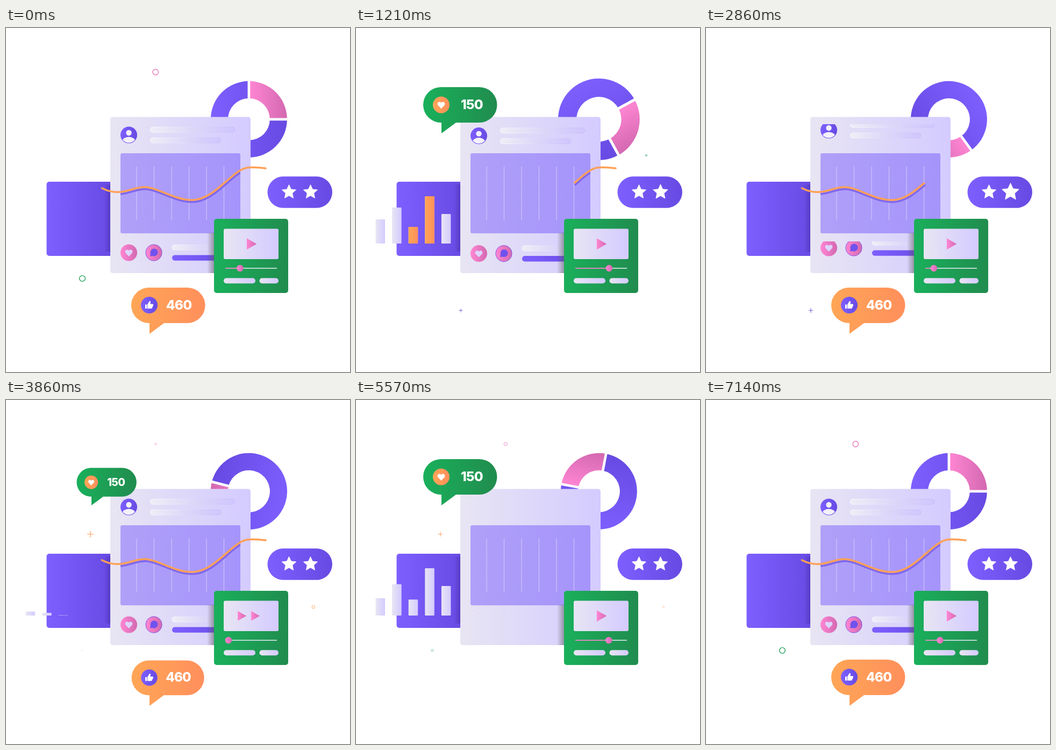
Animation of 640x640 px, one loop 7210 ms. Source, as an HTML page:

```html
<!DOCTYPE html>
<html lang="en">
<head>
<meta charset="utf-8">
<title>Social dashboard</title>
<style>
  html, body { margin: 0; width: 100%; height: 100%; overflow: hidden; background: #fff; }
  svg { display: block; width: 100%; height: 100%; }
  text { font: 800 24.5px Inter, sans-serif; letter-spacing: -.8px; text-anchor: middle; fill: #fff; }
</style>
</head>
<body>
<svg viewBox="0 0 640 640">
  <defs>
    <linearGradient id="violet"><stop stop-color="#7d5fff"/><stop offset="1" stop-color="#674ae2"/></linearGradient>
    <linearGradient id="pink"><stop stop-color="#ff86d3"/><stop offset="1" stop-color="#d368b0"/></linearGradient>
    <linearGradient id="pale"><stop stop-color="#e8e5f3"/><stop offset="1" stop-color="#d4cbff"/></linearGradient>
    <linearGradient id="green"><stop stop-color="#1ab05b"/><stop offset="1" stop-color="#208c4e"/></linearGradient>
    <linearGradient id="orange"><stop stop-color="#ffa656"/><stop offset="1" stop-color="#ff8f5c"/></linearGradient>
    <linearGradient id="panel"><stop stop-color="#b0a0f8"/><stop offset="1" stop-color="#a594fb"/></linearGradient>
    <linearGradient id="field"><stop stop-color="#efedf6"/><stop offset=".5" stop-color="#ddd7f8"/><stop offset="1" stop-color="#d0c6fd"/></linearGradient>
    <linearGradient id="edge"><stop stop-color="#fff"/><stop offset="1" stop-color="#c3b7f8"/></linearGradient>
    <linearGradient id="dusk"><stop stop-color="#4a30b0" stop-opacity="0"/><stop offset="1" stop-color="#4a30b0" stop-opacity=".65"/></linearGradient>
    <linearGradient id="shade"><stop stop-color="#555" stop-opacity="0"/><stop offset="1" stop-color="#555" stop-opacity=".55"/></linearGradient>
    <clipPath id="topRow"><rect x="205" y="179" width="240" height="40"/></clipPath>
    <clipPath id="bottomRow"><rect x="205" y="397" width="240" height="41"/></clipPath>
    <clipPath id="panelBox"><rect x="213" y="233" width="223" height="149"/></clipPath>
    <clipPath id="face"><circle cx="228.5" cy="199" r="14.5"/></clipPath>
    <path id="wave" pathLength="1" d="M178.5 298C192 305 205 307 220 304S244 296 258 296C283 296.500 312 320 346 320C388 320 420 265 448 260C460 258.500 472 259.500 483 261"/>
    <path id="balloon" d="M-1-86H70.500A33 33 0 0 1 70.500-20H27L0 0V-20H-1A33 33 0 0 1-1-86Z"/>
    <path id="heart" d="M0 6.500L-6 .3C-9-3.500-4-8.500 0-4.300C4-8.500 9-3.500 6 .3Z"/>
    <path id="play" d="M-8.800-10.500L9.500 0L-8.800 10.500Z" fill="url(#pink)" stroke-linejoin="round"/>
    <path id="star" fill="#fff" stroke="#fff" stroke-width=".8" stroke-linejoin="round"/>
  </defs>

  <g id="donut">
    <path d="M-71 0A71 71 0 1 0 0-71V-39A39 39 0 1 1-39 0Z" fill="none"/>
    <path d="M0-71A71 71 0 1 0 71 0H39A39 39 0 1 1 0-39Z" fill="url(#violet)"/>
    <path d="M0-71A71 71 0 0 1 71 0H39A39 39 0 0 0 0-39Z" fill="url(#pink)"/>
    <path d="M0-36V-74M36 0H74" stroke="#fff" stroke-width="4.700"/>
  </g>

  <rect x="75.500" y="286" width="125" height="138" rx="5" fill="url(#violet)"/>
  <rect x="183" y="291" width="12" height="125" fill="url(#dusk)"/>
  <rect x="194" y="165.500" width="261" height="290.500" rx="4.500" fill="url(#pale)"/>

  <g clip-path="url(#topRow)"><g class="row">
    <circle cx="228.500" cy="199" r="15.500" fill="url(#violet)"/>
    <g clip-path="url(#face)" fill="#f3f1fb">
      <circle cx="228.500" cy="195" r="5.200"/>
      <ellipse cx="228.500" cy="212" rx="12.500" ry="9.500"/>
    </g>
    <g fill="url(#field)" stroke="url(#edge)" stroke-width=".8">
      <rect x="268.500" y="184.300" width="157" height="9.800" rx="4.900"/>
      <rect x="268.500" y="204.300" width="131" height="9.500" rx="4.700"/>
    </g>
  </g></g>

  <rect x="213" y="233" width="223" height="149" rx="3" fill="url(#panel)"/>
  <path d="M243 257.500V357.500M275.500 257.500V357.500M308 257.500V357.500M340.500 257.500V357.500M373 257.500V357.500M405.500 257.500V357.500" stroke="#cbc1fc" stroke-width="1.300"/>

  <g clip-path="url(#bottomRow)"><g class="row">
    <circle cx="228.500" cy="418" r="15.500" fill="url(#pink)"/>
    <use href="#heart" x="228.500" y="418.500" fill="#ddd5fd"/>
    <circle cx="275" cy="418" r="15.200" fill="url(#pink)" stroke="#7656ee" stroke-width=".9"/>
    <path d="M268 424.500L269 420A7 7 0 1 1 273 424Z" fill="#7052ee"/>
    <rect x="309" y="403.500" width="118" height="9.500" rx="4.700" fill="url(#field)" stroke="url(#edge)" stroke-width=".8"/>
    <rect x="309" y="422.500" width="118" height="10.300" rx="5" fill="url(#violet)"/>
  </g></g>

  <g id="bars"></g>

  <g fill="none" stroke-linecap="round" stroke-width="3.600">
    <g clip-path="url(#panelBox)"><use href="#wave" class="line" x="1" y="3.800" stroke="#8068ec"/></g>
    <use href="#wave" class="line" stroke="#ffa057"/>
  </g>

  <rect x="374" y="381" width="14" height="75" fill="url(#shade)"/>
  <rect x="387" y="355" width="138" height="138" rx="5" fill="url(#green)"/>
  <rect x="405" y="373.500" width="102" height="56.500" rx="3" fill="url(#pale)"/>
  <use id="playA" href="#play"/>
  <use id="playB" href="#play"/>
  <path d="M408 447H504" stroke="#b9d8d0" stroke-width="1.800"/>
  <path id="played" stroke="#d78abb" stroke-width="1.800"/>
  <circle id="knob" cy="447" r="6.200" fill="url(#pink)"/>
  <rect x="405" y="465.300" width="59" height="10" rx="5" fill="url(#pale)"/>
  <rect x="471.500" y="465.300" width="35.500" height="10" rx="5" fill="url(#pale)"/>

  <rect x="486.500" y="276.300" width="120.500" height="58.500" rx="29.200" fill="url(#violet)"/>
  <use id="starA" href="#star"/>
  <use id="starB" href="#star"/>

  <g id="likes">
    <use href="#balloon" fill="url(#green)"/>
    <circle cx="-.5" cy="-53" r="15.500" fill="url(#orange)"/>
    <use href="#heart" x="-.5" y="-52.500" fill="#fff"/>
    <text x="56.500" y="-45">150</text>
  </g>
  <g id="thumbs">
    <use href="#balloon" fill="url(#orange)"/>
    <circle cx="-.5" cy="-53.500" r="15.500" fill="url(#violet)"/>
    <path transform="translate(-.5 -53.500)" d="M-7.500-1h3v7.500h-3zM-3.500 6.500V-1L.5-7.500Q3-7.500 2.500-5L1.700-2H6Q8-2 7.500 0L5.500 5Q5 6.500 3.500 6.500Z" fill="#fff"/>
    <text x="54.500" y="-45.500">460</text>
  </g>
  <g id="sparks" fill="none"></g>
</svg>
<script>
const LOOP = 7210, STEP = 71.4, LAST = 100;
const $ = id => document.getElementById(id);
const all = name => [...document.querySelectorAll(name)];

const clamp = v => Math.min(1, Math.max(0, v));
const linear = u => u;
const easeIn = u => u * u;
const easeOut = u => 1 - (1 - u) ** 2;
const easeBoth = u => u < .5 ? 2 * u * u : 1 - 2 * (1 - u) ** 2;
const ramp = (x, from, to, ease = linear) => ease(clamp((x - from) / (to - from)));
const mod = (x, period) => (x % period + period) % period;
const distance = (x, peak, period) => {
  const d = mod(x - peak, period);
  return Math.min(d, period - d);
};
const pulse = (d, width) => d < width ? Math.cos(d / width * Math.PI / 2) ** 2 : 0;

// Steps are [time, value, easing into it].
function tween(steps, x) {
  const i = steps.findIndex(s => s[0] > x);
  if (i < 0) return steps[steps.length - 1][1];
  if (i === 0) return steps[0][1];
  const [t0, v0] = steps[i - 1], [t1, v1, ease] = steps[i];
  return v0 + (v1 - v0) * ramp(x, t0, t1, ease);
}

function place(el, x, y, scale, extra = "") {
  el.setAttribute("transform", `translate(${x} ${y}) ${extra} scale(${scale})`);
  el.style.display = scale > .005 ? "" : "none";
}

$("star").setAttribute("d", "M" + Array.from({ length: 10 }, (_, i) => {
  const r = i % 2 ? 6.6 : 13.8, a = i * Math.PI / 5;
  return `${(r * Math.sin(a)).toFixed(2)} ${(-r * Math.cos(a)).toFixed(2)}`;
}).join("L") + "Z");

const barTops = [356, 334, 370, 313, 346];
$("bars").innerHTML = barTops.map((top, i) => {
  const rect = fill => `<rect y="${top - 401}" width="17.500" height="${401 - top}" rx="1" fill="url(#${fill})"/>`;
  return `<g>${rect("pale")}${i === 2 || i === 3 ? rect("orange") : ""}</g>`;
}).join("");
const bars = [...$("bars").children];

// Shape, x, y, size, colour, peak, half width of the twinkle.
const sparks = [
  ["ring", 278.3, 82, 5.2, "#e878c0", 0, 5.7],
  ["ring", 142, 466, 5.4, "#22a05a", -.5, 5],
  ["ring", 572, 385, 5, "#ff9a58", 7, 5.5],
  ["plus", 157, 249.5, 6, "#ff9a58", 5.1, 5.1],
  ["plus", 540, 237, 4, "#2aa377", 19.2, 4.5],
  ["plus", 195, 525.5, 4.2, "#7d68dc", 15.3, 4.8],
  ["plus", 350, 140, 3.8, "#7560f0", 10.5, 4.7],
  ["plus", 417.5, 532.5, 6.6, "#e070bb", 10.5, 4.7]
];
$("sparks").innerHTML = sparks.map(([shape, , , r, colour]) => shape === "ring"
  ? `<circle r="${r}" stroke="${colour}" stroke-width="1.400"/>`
  : `<path d="M${-r} 0H${r}M0 ${-r}V${r}" stroke="${colour}" stroke-width="1.200"/>`).join("");
const sparkEls = [...$("sparks").children];

const likeSteps = [[1, 0], [7, 1.08, easeOut], [11, 1, easeBoth], [28, 1], [33, 0, easeIn]];
const thumbSteps = [[3.2, 1], [9.2, 0, easeIn], [28, 0], [34, 1.075, easeOut], [38.5, 1, easeBoth]];
const glowSteps = [[12, 0], [14, 1], [17.5, 1], [19.5, 0]];
const knobSteps = [[0, 435.5], [17, 471], [20, 474], [40, 424], [47, 414], [54, 414], [70, 456], [85, 483], [100, 435.5]];
const splitSteps = [[49, 0], [52, 1], [57, 1], [60, 0]];

function scrollOffset(k) {
  const p = mod(k - 2, 100 / 3);
  if (p < 9.8) return -40 * easeIn(p / 9.8);
  return 40 * (1 - ramp(p, 9.8, 17.7)) ** 3;
}

function draw(k) {
  const half = k % 50;

  const swell = 1 + .07 * pulse(distance(k, 50 / 3, 100 / 3), 4.5);
  place($("donut"), 451.9, 169.8, swell, `rotate(${k * 3.6})`);

  for (const row of all(".row")) row.setAttribute("transform", `translate(0 ${scrollOffset(k)})`);

  bars.forEach((bar, i) => {
    const start = 1.7 + .75 * i, end = 33 + .95 * i;
    const height = ramp(half, start, start + 8, easeBoth) - ramp(half, end - 8, end, easeBoth);
    place(bar, 36.5 + 30.6 * i, 401, height, `scale(${1 / Math.max(height, .001)} 1)`);
    if (bar.children[1]) bar.children[1].style.opacity = tween(glowSteps, half);
  });

  const erasing = half < 31;
  const from = erasing ? ramp(half, 5.7, 28.7, easeOut) : 0;
  const to = erasing ? 1 : ramp(half, 33, 44, easeBoth);
  $("wave").setAttribute("stroke-dasharray", `${to - from} 2`);
  $("wave").setAttribute("stroke-dashoffset", -from);
  for (const line of all(".line")) line.style.display = to - from > .003 ? "" : "none";

  const split = tween(splitSteps, k);
  place($("playA"), 456.8 - 18 * split, 401.7, 1 - .13 * split);
  place($("playB"), 456.8 + 7 * split, 401.7, 1 - .13 * split);
  $("playB").style.opacity = split;

  const knob = tween(knobSteps, k);
  $("knob").setAttribute("cx", knob);
  $("played").setAttribute("d", `M408 447H${knob}`);

  place($("starA"), 526.5, 305.3, 1 + .25 * pulse(distance(k, 7.2, 25.7), 5.5));
  place($("starB"), 566.5, 305.3, 1 + .25 * pulse(distance(k, 12.7, 25.7), 6));

  place($("likes"), 159, 196, tween(likeSteps, half));
  place($("thumbs"), 267, 569, tween(thumbSteps, half));

  sparks.forEach(([, x, y, , , peak, width], i) =>
    place(sparkEls[i], x, y, clamp(1.25 * (1 - distance(k, peak, 25) / width))));
}

const begin = performance.now();
function tick() {
  const time = (performance.now() - begin) % LOOP;
  draw(Math.min(LAST, Math.floor((time + 6) / STEP)));
  requestAnimationFrame(tick);
}
tick();
</script>
</body>
</html>
```
